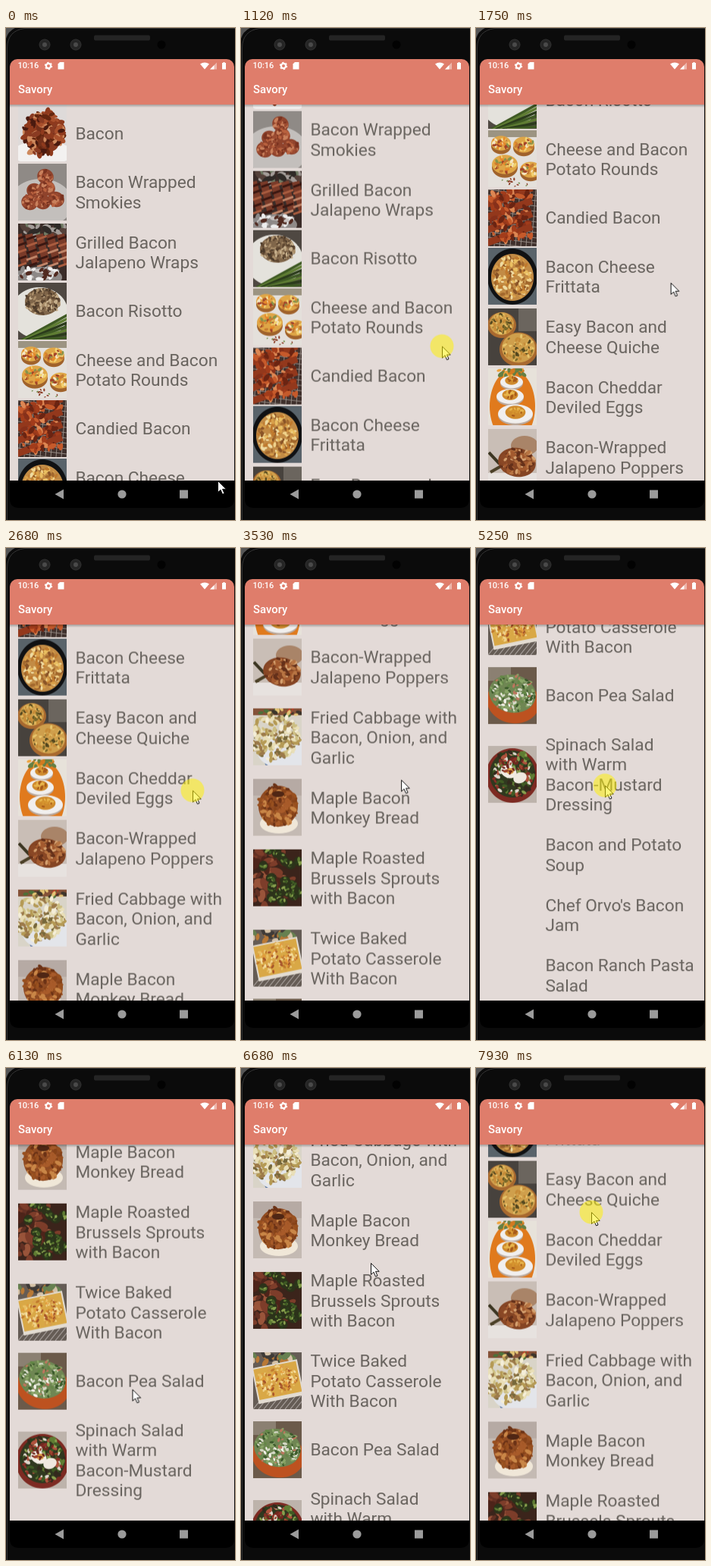
An HTML page with a canvas for the animation above (8 s loop, 302 by 649 pixels).

```html
<!DOCTYPE html>
<html lang="en">
<head>
<meta charset="utf-8">
<title>Recipe list</title>
<style>
  html, body { margin: 0; width: 100%; height: 100%; overflow: hidden; background: #0b0b0b; }
  body { position: relative; font-family: Roboto, sans-serif; }
  svg { position: absolute; left: 0; top: 0; }
  .view { position: absolute; left: 5px; top: 101px; width: 296px; height: 496px; overflow: hidden; background: #e3dad7; }
  .list { padding-top: .75px; animation: scroll 8s linear infinite; }
  .row { display: flex; align-items: center; white-space: pre; font-size: 22.7px; line-height: 26.5px; color: #69645f; }
  .label { position: relative; top: .7px; }
  .photo { position: relative; top: -1px; flex: none; width: 64px; height: 75px; margin: 0 11.4px 0 11px; }
  .late { animation: load 8s linear infinite; }
  .view::after { content: ""; position: absolute; inset: 0 0 auto; height: 4px; background: linear-gradient(#0004, #0000); }
  .bar { position: absolute; left: 5px; top: 41px; width: 296px; height: 60px; background: #df7d6b; border-radius: 10px 10px 0 0; color: #fff; font-weight: 500; }
  .bar span { position: absolute; left: 11px; line-height: 20px; }
  .bar .time { left: 10.4px; top: -1px; font-size: 11px; }
  .title { top: 30px; font-size: 14.9px; }
  .pointer { position: absolute; left: 0; top: 0; width: 0; height: 0; animation: move 8s linear infinite; }
  .pointer svg { overflow: visible; }
  .touch { animation: press 8s step-end infinite; }

  @keyframes scroll {
    0%, 6.25% { transform: translateY(0); }
    14% { transform: translateY(-69px); }
    18.75% { transform: translateY(-230px); animation-timing-function: ease-out; }
    25%, 27.5% { transform: translateY(-300px); }
    33.5% { transform: translateY(-448px); }
    36.5% { transform: translateY(-545px); animation-timing-function: ease-out; }
    45%, 46.25% { transform: translateY(-690px); }
    54% { transform: translateY(-931px); }
    56.75% { transform: translateY(-991px); }
    59.625% { transform: translateY(-991px); animation-timing-function: ease-out; }
    62.5%, 65.1% { transform: translateY(-1131.75px); }
    65.625% { transform: translateY(-1125px); }
    70.6% { transform: translateY(-1075px); }
    74.4% { transform: translateY(-960px); animation-timing-function: ease-out; }
    83.5% { transform: translateY(-816px); }
    84.5% { transform: translateY(-814px); }
    90% { transform: translateY(-675px); animation-timing-function: ease-out; }
    96.25%, 97% { transform: translateY(-558px); }
    99.1%, 100% { transform: translateY(-525.5px); }
  }
  @keyframes move {
    0%, .875% { transform: translate(279px, 597px); }
    3.25%, 5.5% { transform: translate(268px, 539px); }
    14% { transform: translate(265px, 420px); }
    18.75% { transform: translate(258px, 262px); }
    27.5% { transform: translate(254px, 468px); }
    33.5% { transform: translate(246px, 320px); }
    36.5% { transform: translate(236px, 222px); }
    46% { transform: translate(205px, 326px); }
    54% { transform: translate(192px, 85px); }
    56.75%, 59.625% { transform: translate(183px, 25px); }
    64.9% { transform: translate(171px, 306px); }
    65.625% { transform: translate(170px, 313px); }
    70.6% { transform: translate(168px, 363px); }
    74.4% { transform: translate(165px, 478px); }
    83.5% { transform: translate(171px, 257px); }
    84.5% { transform: translate(171px, 259px); }
    90% { transform: translate(160px, 398px); }
    96.25% { transform: translate(154px, 157px); }
    99.1%, 100% { transform: translate(152px, 190px); }
  }
  @keyframes press {
    0%, 18.75%, 36.5%, 59.7%, 74.4%, 90% { opacity: 0; }
    3.2%, 27.5%, 46.1%, 64.9%, 84.5%, 96.4%, 100% { opacity: 1; }
  }
  @keyframes load {
    0%, 53.9% { opacity: 0; }
    56.75%, 100% { opacity: 1; }
  }
</style>
</head>
<body>
<svg width="302" height="649">
  <rect width="302" height="649" fill="#0b0b0b"/>
  <path d="M1.5 649V26Q2 4 24 .5H302" fill="none" stroke="#363636"/>
  <path d="M0 0H12Q3 4 0 14Z" fill="#555"/>
  <rect x="116" y="9.500" width="74" height="7" rx="2" fill="#242424"/>
  <g fill="#252525" stroke="#333">
    <circle cx="51" cy="22" r="7"/><circle cx="92" cy="22" r="7"/>
  </g>
  <g fill="#4a4a4a"><circle cx="51" cy="22" r="3"/><circle cx="92" cy="22" r="3"/></g>
  <circle cx="205" cy="22" r="5.500" fill="#020202"/>
  <path d="M5 597H301V621Q301 633 289 633H17Q5 633 5 621Z" fill="#000"/>
  <g fill="#9b9b9b">
    <path d="M64.500 615L76 608.500V621.500Z"/>
    <circle cx="153" cy="615" r="5.600"/>
    <rect x="229" y="609.500" width="11" height="11"/>
  </g>
</svg>

<div class="view"><div class="list"></div></div>

<div class="bar">
  <span class="time">10:16</span><span class="title">Savory</span>
  <svg width="296" height="60" fill="#fff">
    <circle cx="51" cy="9" r="3.100" fill="none" stroke="#fff" stroke-width="2.200"/>
    <circle cx="51" cy="9" r="4.600" fill="none" stroke="#fff" stroke-width="1.200" stroke-dasharray="2.400 2.417"/>
    <path d="M66 4H71.500V13.500H63.500V6.500Z"/>
    <path d="M251 6.500Q257 2.500 263 6.500L257 13.500Z"/>
    <path d="M264 13.500L273 4.500V13.500Z" fill-opacity=".45"/>
    <path d="M264 13.500L269.500 8V13.500Z"/>
    <path d="M280 5H281.500V4H283.500V5H285V13.500H280Z"/>
  </svg>
</div>

<div class="pointer">
  <svg width="1" height="1">
    <path d="M.5 .5V15.500L4 12.200L6.500 18L9 17L6.500 11.300H11.200Z" fill="#fff" stroke="#111"/>
    <circle class="touch" r="15.500" fill="#fff200" fill-opacity=".52"/>
  </svg>
</div>

<script>
let seed = 7;
const random = () => (seed = seed * 16807 % 2147483647) / 2147483647;
const pick = list => list[Math.floor(random() * list.length)];
let g;

const fill = color => { g.fillStyle = color; g.fillRect(0, 0, 64, 75); };
const rect = (x, y, w, h, color) => { g.fillStyle = color; g.fillRect(x, y, w, h); };
const oval = (x, y, rx, ry, color, turn = 0) => {
  g.fillStyle = color;
  g.beginPath();
  g.ellipse(x, y, rx, ry, turn, 0, 7);
  g.fill();
};
const strip = (x1, y1, x2, y2, width, color) => {
  g.strokeStyle = color;
  g.lineWidth = width;
  g.beginPath();
  g.moveTo(x1, y1);
  g.lineTo(x2, y2);
  g.stroke();
};
// Scatters small ovals inside a larger one.
const bits = (count, x, y, rx, ry, size, colors) => {
  while (count--) {
    const a = random() * 7, r = Math.sqrt(random()), s = size * (.5 + random() * .7);
    oval(x + Math.cos(a) * r * rx, y + Math.sin(a) * r * ry, s, s * .55, pick(colors), random() * 3);
  }
};

const rust = ["#8a3b22", "#a9502c", "#4a1a0f", "#cf8a5e", "#8f3a1d", "#64260f"];
const gold = ["#d9a04a", "#eabf62", "#c07a2e", "#f0d28a"];
const green = ["#3f5a24", "#5f7d33", "#2b3b1b", "#88a04e"];
const pale = ["#e9dfb8", "#f4eed8", "#cdbf83", "#b59a55"];

function bacon() {
  fill("#dedad9");
  oval(32, 64, 40, 16, "#f3f1f0");
  oval(33, 39, 25, 26, "#74301a");
  bits(150, 33, 38, 26, 29, 6, rust);
}
function smokies() {
  fill("#8f8a86");
  oval(30, 52, 42, 32, "#c3bfbc");
  for (const [x, y] of [[36, 17], [38, 32], [22, 36], [15, 51], [32, 50], [50, 47]]) {
    oval(x, y, 11, 10, "#8f432c", .5);
    bits(24, x, y, 9, 8, 3.5, ["#b9623f", "#7a3320", "#c9805c", "#9c4b31"]);
  }
}
function wraps() {
  fill("#3a2c28");
  bits(40, 32, 6, 34, 10, 6, ["#6f7a63", "#a39c98", "#2f2a27", "#55413a"]);
  for (let x = 6; x < 70; x += 14) {
    strip(x - 6, 14, x + 3, 52, 10, "#7a3b29");
    for (let y = 16; y < 54; y += 9) strip(x - 9, y + 5, x + 5, y, 3, pick(["#c08468", "#3b1711", "#a95c3f"]));
  }
  oval(28, 71, 30, 14, "#8f8a88");
  bits(50, 28, 66, 28, 9, 4.5, ["#eee", "#8c8887", "#512a20", "#c9c4c2"]);
}
function risotto() {
  fill("#4f4842");
  oval(28, 40, 38, 34, "#e4e2dc");
  oval(32, 25, 23, 18, "#80664a");
  bits(150, 32, 25, 23, 18, 2.6, ["#a98d69", "#5f4731", "#c7b08d", "#4b3a2a"]);
  for (let i = 0; i < 8; i++) strip(4 + i * 3, 76, 66, 42 + i * 5, 3.5, green[i % 3]);
}
function rounds() {
  fill("#e4e0db");
  rect(0, 0, 64, 9, "#9c9482");
  for (const [x, y, r] of [[17, 17, 13], [47, 19, 14], [22, 45, 17], [56, 52, 14]]) {
    oval(x, y + 4, r, r * .8, "#a0622b");
    oval(x, y, r, r * .75, "#dfa647");
    bits(40, x, y, r * .85, r * .6, 3, ["#e78a2c", "#f2d271", "#a2432a", "#f5e6c2", "#86944b", "#c57a33"]);
  }
  bits(12, 34, 69, 28, 5, 1.8, ["#8b3b25", "#628338"]);
}
function candied() {
  fill("#3f302c");
  for (let i = 0; i < 80; i += 7) {
    strip(i, 0, i - 6, 75, 1, "#948a84");
    strip(0, i, 64, i + 8, 1, "#948a84");
  }
  for (let i = 0; i < 4; i++) {
    const y = 20 + i * 17;
    strip(-3, y, 58, y - 22, 9, "#93381c");
    bits(30, 28, y - 11, 29, 8, 5, ["#c65a2b", "#6b2412", "#dd8753", "#a23c1b", "#86301a"]);
  }
}
function frittata() {
  fill("#59636a");
  oval(32, 38, 33, 37, "#101113");
  oval(32, 39, 28, 31, "#c28b45");
  bits(170, 32, 39, 25, 28, 3.2, [...gold, "#8a5427", "#efdba2", "#a3682d"]);
}
function quiche() {
  fill("#47423d");
  rect(40, 0, 24, 30, "#6b655e");
  for (const [x, y, r] of [[18, 20, 19], [40, 52, 25]]) {
    oval(x, y + 2, r, r * .9, "#a8692f");
    oval(x, y, r - 3, r * .78, "#cf9f4c");
    bits(80, x, y, r - 5, r * .68, 2.6, ["#e8c56c", "#7c6a2a", "#54471f", "#c68b37", "#e0b65c"]);
  }
}
function eggs() {
  fill("#e7e2da");
  oval(32, 50, 30, 48, "#e07a1d");
  bits(26, 32, 6, 22, 7, 5, ["#657f43", "#efa23a", "#d27a20"]);
  for (const [x, y, r] of [[31, 18, 15], [29, 37, 18], [36, 60, 23]]) {
    oval(x, y + 2, r, r * .57, "#b9a89c");
    oval(x, y, r, r * .55, "#f1efee");
    oval(x, y - 2, r * .58, r * .38, "#cf8a2c");
    bits(16, x, y - 3, r * .4, r * .25, 3, ["#e8b54c", "#a85a1a", "#d6952f"]);
  }
}
function poppers() {
  fill("#c9beb6");
  rect(0, 58, 64, 17, "#e7e2df");
  oval(48, 22, 18, 13, "#a98468");
  strip(1, 31, 15, 46, 4, "#3b3521");
  strip(3, 57, 17, 49, 4, "#4b4027");
  oval(38, 44, 25, 19, "#854524", .2);
  bits(100, 38, 43, 24, 17, 4, ["#b87543", "#64301a", "#d4a06f", "#a35a2f", "#8a4826"]);
}
function cabbage() {
  fill("#d9d4c8");
  rect(0, 0, 64, 9, "#855238");
  bits(24, 36, 5, 32, 6, 4, ["#4c7139", "#b3422c", "#e4c475", "#3d352b"]);
  oval(50, 66, 36, 24, "#516f9d");
  oval(44, 58, 38, 22, "#e3e5ea");
  bits(230, 28, 38, 32, 30, 4.5, [...pale, "#e9dfb8", "#77683b", "#9c7a4a"]);
}
function bread() {
  fill("#c4bab3");
  rect(0, 0, 64, 22, "#b6aaa4");
  oval(34, 59, 25, 13, "#f0e7d8");
  oval(33, 36, 26, 27, "#8f4b23");
  bits(150, 33, 35, 25, 27, 4.2, ["#a85b2a", "#6b3216", "#c98647", "#874319", "#98501f"]);
  oval(33, 20, 8, 4, "#4f2614");
}
function sprouts() {
  fill("#3b241b");
  bits(60, 20, 38, 32, 40, 8, ["#7d3d2a", "#4d241a", "#99543a", "#633023"]);
  for (let i = 0; i < 24; i++) {
    const x = 8 + random() * 54, y = random() * 73;
    oval(x, y, 7, 6, "#2c321a", random() * 3);
    bits(6, x, y, 4, 4, 3, green);
  }
}
function casserole() {
  fill("#655c55");
  bits(30, 24, 6, 28, 8, 6, ["#b97936", "#d5c2a7", "#3f3b38", "#668050"]);
  for (let i = 0; i < 64; i += 7) strip(i, 75, i + 20, 50, 1, "#b5aeaa");
  g.save();
  g.translate(31, 38);
  g.rotate(-.2);
  rect(-29, -23, 61, 48, "#e3dcd2");
  rect(-27, -21, 57, 41, "#d9a846");
  bits(170, 1, -1, 27, 19, 2.6, [...gold, "#e59a3a", "#a7552a", "#f5dfa0"]);
  g.restore();
}
function peas() {
  fill("#6b5a4a");
  rect(0, 0, 30, 18, "#8b8072");
  oval(33, 45, 35, 29, "#bd5220", .2);
  oval(32, 35, 31, 25, "#6f8653", .2);
  bits(190, 32, 34, 30, 24, 2.8, ["#638846", "#8aa668", "#d5d9c6", "#f3f1e9", "#3d5b2c", "#bd765e"]);
}
function spinach() {
  fill("#bdb3ab");
  oval(32, 39, 35, 36, "#7d2a22");
  oval(32, 37, 30, 31, "#30381f");
  bits(130, 32, 36, 29, 30, 4.2, [...green, "#8b2f27", "#b0523d", "#ded7cc", "#33291d"]);
  oval(27, 34, 11, 8, "#f2ece3", .4);
  oval(42, 42, 9, 7, "#efe9df", -.4);
  oval(29, 33, 5, 4, "#dda045");
  bits(24, 32, 26, 20, 10, 3.5, ["#a0452f", "#70281f"]);
}

const dishes = [
  ["Bacon", bacon],
  ["Bacon Wrapped\nSmokies", smokies],
  ["Grilled Bacon\nJalapeno Wraps", wraps],
  ["Bacon Risotto", risotto],
  ["Cheese and Bacon\nPotato Rounds", rounds],
  ["Candied Bacon", candied],
  ["Bacon Cheese\nFrittata", frittata],
  ["Easy Bacon and\nCheese Quiche", quiche],
  ["Bacon Cheddar\nDeviled Eggs", eggs],
  ["Bacon-Wrapped\nJalapeno Poppers", poppers],
  ["Fried Cabbage with\nBacon, Onion, and\nGarlic", cabbage],
  ["Maple Bacon\nMonkey Bread", bread],
  ["Maple Roasted\nBrussels Sprouts\nwith Bacon", sprouts],
  ["Twice Baked\nPotato Casserole\nWith Bacon", casserole],
  ["Bacon Pea Salad", peas],
  ["Spinach Salad\nwith Warm\nBacon-Mustard\nDressing", spinach],
  ["Bacon and Potato\nSoup"],
  ["Chef Orvo's Bacon\nJam"],
  ["Bacon Ranch Pasta\nSalad"]
];

const list = document.querySelector(".list");
for (const [name, paint] of dishes) {
  const row = document.createElement("div");
  const photo = document.createElement("canvas");
  const label = document.createElement("div");
  row.className = "row";
  row.style.height = Math.max(75.5, 26.5 * (name.split("\n").length + 1)) + "px";
  photo.className = paint === spinach ? "photo late" : "photo";
  photo.width = 128;
  photo.height = 150;
  label.className = "label";
  label.textContent = name;
  if (paint) {
    g = photo.getContext("2d");
    g.scale(2, 2);
    paint();
  }
  row.append(photo, label);
  list.append(row);
}
</script>
</body>
</html>
```
